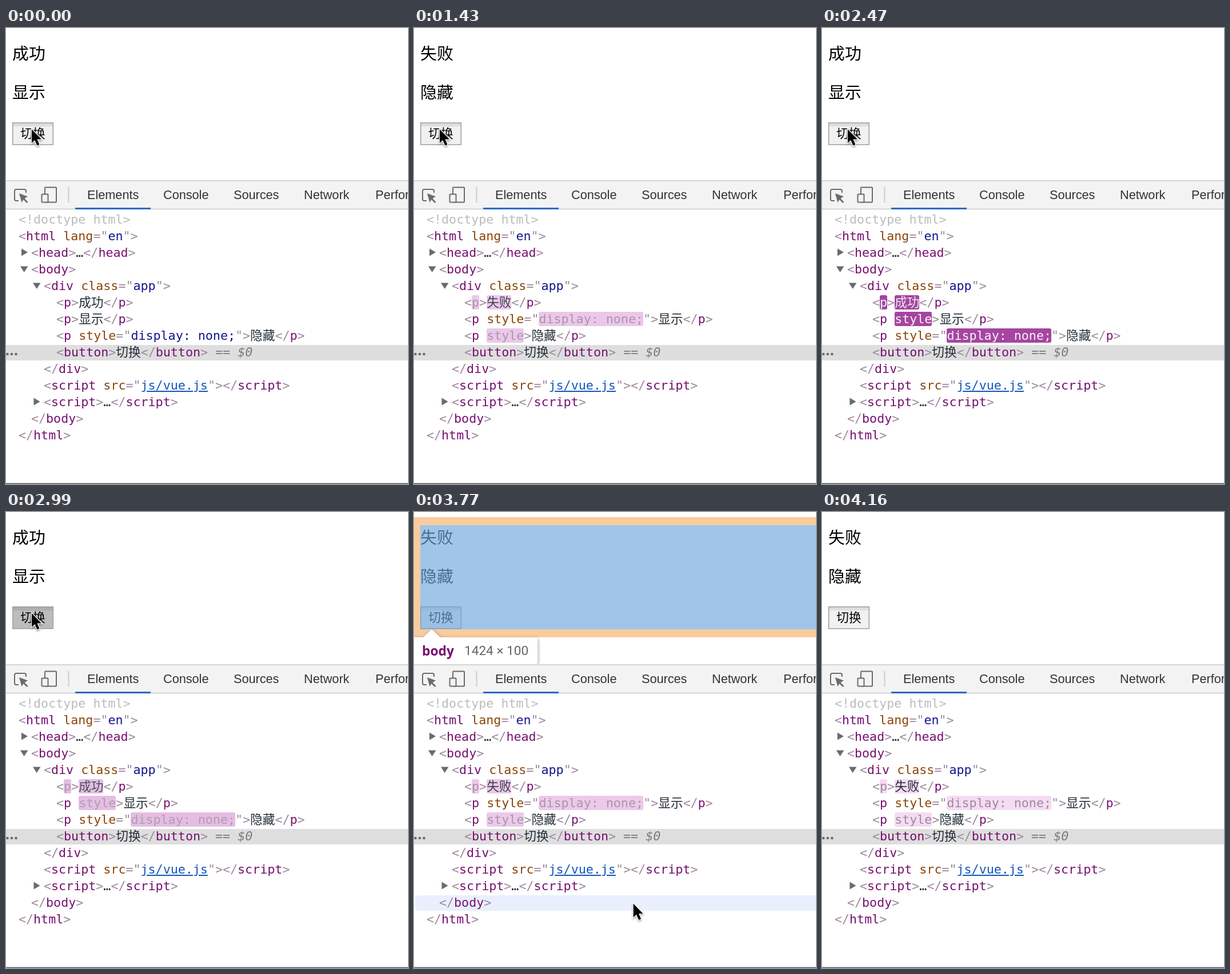
An HTML page for the animation above (4.29 s loop, 703x797 px).

```html
<!DOCTYPE html>
<html lang="zh-CN">
<head>
<meta charset="utf-8">
<title>切换</title>
<style>
  html, body { margin: 0; width: 100%; height: 100%; overflow: hidden; background: #fff; }
  svg { position: absolute; left: 0; top: 0; width: 703px; height: 797px; }
  .page { font: 28.9px "Noto Sans CJK SC", sans-serif; }
  .tabs { font: 21.67px "Liberation Sans", Arial, sans-serif; font-kerning: none; fill: #333; }
  #code { position: absolute; left: 0; top: 320px; width: 703px; color: #222c35;
          font: 21.67px/29px "DejaVu Sans Mono", "Noto Sans CJK SC", monospace; }
  #code div { height: 29px; white-space: pre; }
  .punct { color: #9e899c; }
  .tag { color: #770f70; }
  .attr { color: #8a4508; }
  .value { color: #13138e; }
  .link { color: #1256bd; text-decoration: underline; }
  .doctype { color: #bcbcbc; }
  .hint { color: #777d82; }
  .flash { border-radius: 3px; animation: flash 1.54s paused; animation-delay: var(--delay); }
  @keyframes flash {
    from { background-color: rgb(158, 54, 153); color: white; }
    80% { background-color: rgb(245, 219, 244); color: inherit; }
    to { background-color: transparent; }
  }
</style>
</head>
<body>
<svg viewBox="0 0 703 797">
  <g class="page">
    <text id="result" x="11" y="54.5"></text>
    <text id="label" x="11" y="123"></text>
    <rect id="button" x="11.8" y="165.8" width="70.5" height="38" stroke="#a2a2a2" stroke-width="1.6"/>
    <path d="M12.6 166.6h69v5.4h-69z" opacity=".08"/>
    <text x="25.3" y="192" font-size="21.67">切换</text>
  </g>

  <g id="overlay">
    <path d="M0 9H703V219H0ZM11 23V205H703V23Z" fill="rgba(246,178,107,.66)" fill-rule="evenodd"/>
    <path d="M11 23H703V205H11Z" fill="rgba(111,168,220,.66)"/>
    <path d="M0 219H16L31 205L46 219H211a5 5 0 0 1 5 5V262a5 5 0 0 1-5 5H0Z" fill="#fff"
          style="filter:drop-shadow(1px 2px 3px rgba(0,0,0,.35))"/>
    <text x="14" y="251" font-family="Noto Sans, sans-serif" font-size="22.8" font-weight="700" fill="#770f70">body</text>
    <text x="88" y="250" font-family="Roboto, sans-serif" font-size="22.6" fill="#666">1424 × 100</text>
    <rect x="2" y="670" width="720" height="27" rx="6" fill="#e9effc"/>
  </g>

  <path d="M0 266H703V317H0Z" fill="#f3f3f3"/>
  <path d="M0 267H703M0 316.5H703" stroke="#cbcbcb" stroke-width="1.6"/>
  <path d="M121 314h132v3h-132z" fill="#2a6bc6"/>
  <g fill="none" stroke="#6b6b6b" stroke-width="2">
    <path d="M22 302H18a3 3 0 0 1-3-3V285a3 3 0 0 1 3-3H32a3 3 0 0 1 3 3V288"/>
    <path d="M23 289L38 294.5L32.5 298L38.5 304L36.5 306L30.5 300L27.5 305Z" fill="#6b6b6b" stroke="none"/>
    <rect x="68" y="278.5" width="20" height="26" rx="1"/>
    <rect x="62.5" y="290.5" width="11" height="14" rx="1" fill="#f3f3f3"/>
    <path d="M109.5 278V305" stroke="#ccc"/>
  </g>
  <g class="tabs">
    <text x="142" y="299">Elements</text>
    <text x="275" y="299">Console</text>
    <text x="398" y="299">Sources</text>
    <text x="521" y="299">Network</text>
    <text x="646" y="299">Performance</text>
  </g>

  <path d="M0 554H703V581H0Z" fill="#dedede"/>
  <path d="M2.5 570h0M10 570h0M17.5 570h0" stroke="#6b6b6b" stroke-width="4.6" stroke-linecap="round"/>
  <path d="M27 385.5v13l11-6.5ZM48.5 646.5v13l11-6.5ZM25 416.5h13.5l-6.8 10.500ZM47 445.5h13.5l-6.8 10.500Z" fill="#6b6b6b"/>
  <path d="M0 796.2H703" stroke="#5c5c5c" stroke-width="1.6"/>
</svg>

<div id="code"></div>

<svg viewBox="0 0 703 797">
  <path id="cursor" d="M0 0V24L5.3 19L9.5 28.5L13.5 26.8L9.4 17.5H17Z" stroke="#fff" stroke-width="2.4"
        paint-order="stroke" style="filter:drop-shadow(0 2px 1.5px rgba(0,0,0,.35))"/>
</svg>

<script>
const LOOP = 4290, STEP = 130;
const TOGGLES = [-1e4, 690, 2350, 3015];
const PRESSES = [650, 2340, 2990];
const HOME = [45, 177], AWAY = [418, 736];
const $ = id => document.getElementById(id);

// Flashing text takes its faded colour from the element around it.
const span = (kind, text) => `<span class="${kind}">${text}</span>`;
const mark = (kind, text) => span(kind + ' flash', text);
const open = (name, attrs = '', paint = span) => span('punct', `&lt;${paint('tag', name)}${attrs}&gt;`);
const close = name => span('punct', `&lt;/${span('tag', name)}&gt;`);
const attr = (name, value, kind = 'value', paint = span) =>
  ` ${span('attr', name)}="${paint(kind, value)}"`;
const row = (indent, html) => `<div style="padding-left:${22 * indent}px">${html}</div>`;

function paragraph(text, hidden, touched) {
  let style = '';
  if (hidden) style = attr('style', 'display: none;', 'value', touched ? mark : span);
  else if (touched) style = ' ' + mark('attr', 'style');
  return row(4, open('p', style) + text + close('p'));
}

function showState(index) {
  const ok = index % 2 === 0, touched = index > 0;
  const paint = touched ? mark : span;
  const result = ok ? '成功' : '失败';
  $('result').textContent = result;
  $('label').textContent = ok ? '显示' : '隐藏';
  $('code').innerHTML = [
    row(1, span('doctype', '&lt;!doctype html&gt;')),
    row(1, open('html', attr('lang', 'en'))),
    row(2, open('head') + '…' + close('head')),
    row(2, open('body')),
    row(3, open('div', attr('class', 'app'))),
    row(4, open('p', '', paint) + paint('text', result) + close('p')),
    paragraph('显示', !ok, touched),
    paragraph('隐藏', ok, touched),
    row(4, open('button') + '切换' + close('button') + span('hint', ' == <i>$0</i>')),
    row(3, close('div')),
    row(3, open('script', attr('src', 'js/vue.js', 'link')) + close('script')),
    row(3, open('script') + '…' + close('script')),
    row(2, close('body')),
    row(1, close('html')),
  ].join('');
}

let shown = -1;
function render(now) {
  const t = Math.floor(now % LOOP / STEP) * STEP;
  const state = TOGGLES.filter(at => at <= t).length - 1;
  if (state !== shown) showState(shown = state);
  $('code').style.setProperty('--delay', `${TOGGLES[state] - t}ms`);

  $('button').setAttribute('fill', PRESSES.includes(t) ? '#bcbcbc' : '#f1f1f1');
  $('overlay').style.display = t >= 3770 && t < 4030 ? '' : 'none';

  const p = Math.min(1, Math.max(0, (t - 3510) / 320));
  const ease = p * p * (3 - 2 * p);
  const [x, y] = HOME.map((from, i) => from + (AWAY[i] - from) * ease);
  $('cursor').setAttribute('transform', `translate(${x} ${y})`);
  $('cursor').style.display = t < 4030 ? '' : 'none';
  requestAnimationFrame(render);
}
render(0);
</script>
</body>
</html>
```
